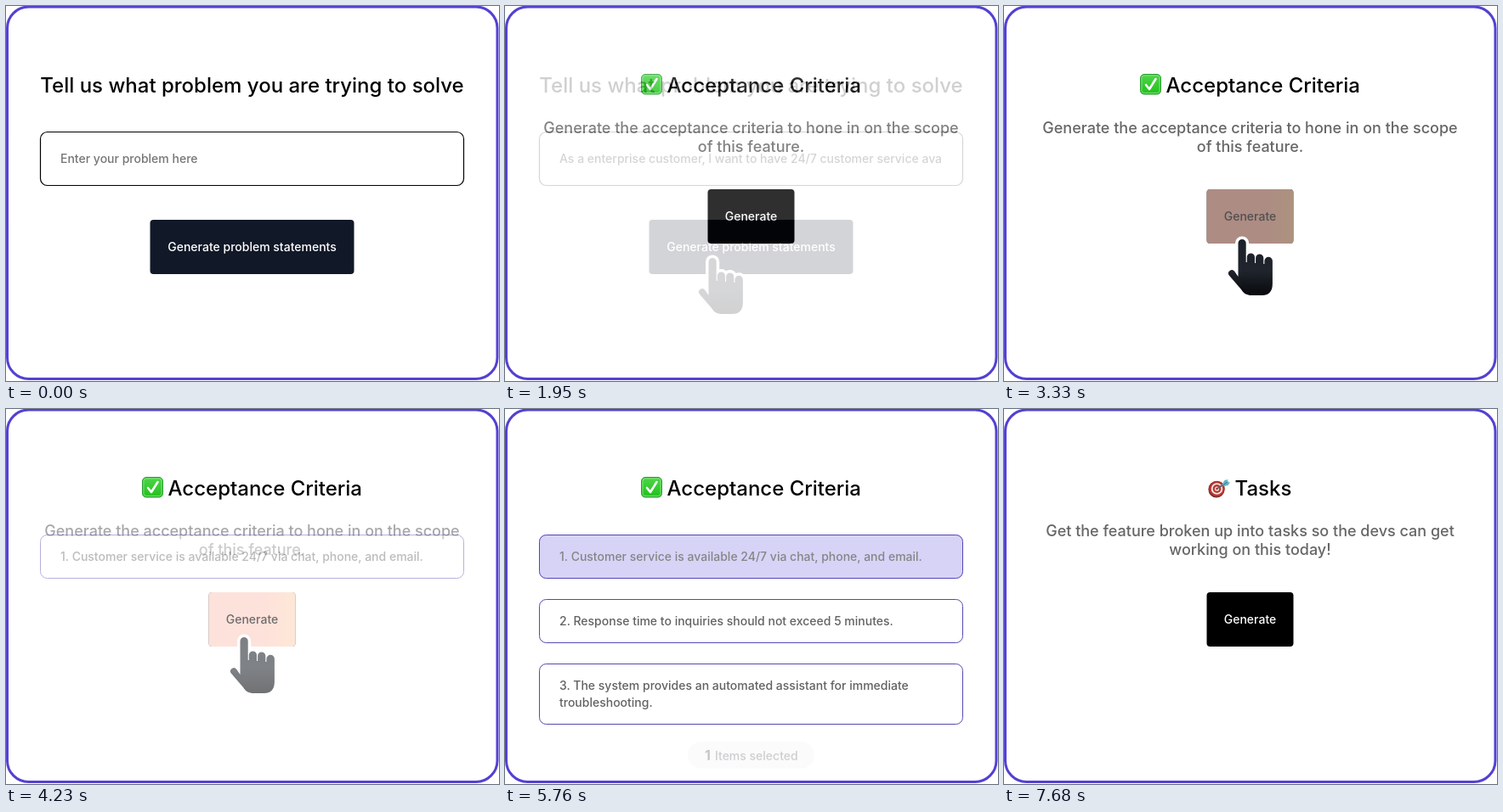
Write an HTML page that moves like this. It is 580 px wide and 442 px high and loops after 8000 ms.

```html
<!DOCTYPE html>
<html lang="en">
<head>
<meta charset="utf-8">
<title>Problem to tasks</title>
<style>
  html, body { margin: 0; width: 100%; height: 100%; overflow: hidden; background: #fff; }
  svg { display: block; }
  text {
    font-family: Inter, "Open Sans", sans-serif;
    font-size: 14px; font-weight: 500; font-optical-sizing: none;
  }
  .title { font-size: 24px; }
  .lead { font-size: 18px; fill: #666; }
  .mid { text-anchor: middle; }
  .item rect { fill: #fff; stroke: #5549b0; }
  .item text { fill: #626262; }

  /* One 8 s clock for all parts: 1% = 80 ms */
  .anim { animation: 8s ease infinite; }
  .hint { animation-name: hint; }
  .prompt { animation-name: prompt; }
  .field { animation-name: field; }
  .hand1 { animation-name: hand1; }
  .criteria { animation-name: criteria; }
  .hand2 { animation-name: hand2; }
  .hover { animation-name: hover; }
  .intro { animation-name: intro; }
  .first { animation-name: first; }
  .second { animation-name: second; }
  .third { animation-name: third; }
  .picked { animation-name: picked; }
  .pill { animation-name: picked, rise; }
  .tasks { animation-name: tasks; animation-timing-function: linear; }

  @keyframes hint { 0%, 1.125% { opacity: 1 } 4.875%, 100% { opacity: 0 } }
  @keyframes prompt { 0%, 1.125% { opacity: 0 } 4.875%, 100% { opacity: 1 } }
  @keyframes field { 0%, 13.5% { stroke: #000 } 17.25%, 100% { stroke: #23233a } }
  @keyframes hand1 {
    0%, 1.125% { opacity: 0; transform: translateY(44px) }
    4.875%, 13.5% { opacity: 1; transform: none }
    17.25%, 100% { opacity: 1; transform: translateY(-27px) }
  }
  @keyframes criteria { 0%, 21.75% { opacity: 0 } 26.875%, 100% { opacity: 1 } }
  @keyframes hand2 {
    0%, 32.25% { transform: translateY(155px) }
    36%, 40.125% { transform: none }
    43.875%, 100% { transform: translateY(-19px) }
  }
  @keyframes hover { 0%, 40.125% { opacity: 0 } 43.875%, 100% { opacity: 1 } }
  @keyframes intro { 0%, 52.5% { opacity: 1 } 54%, 100% { opacity: 0 } }
  @keyframes first { 0%, 52.5% { opacity: 0 } 54%, 100% { opacity: 1 } }
  @keyframes second { 0%, 57.375% { opacity: 0 } 61.125%, 100% { opacity: 1 } }
  @keyframes third { 0%, 64.5% { opacity: 0 } 68.25%, 100% { opacity: 1 } }
  @keyframes picked { 0%, 71.25% { opacity: 0 } 75.75%, 100% { opacity: 1 } }
  @keyframes rise { 0%, 71.25% { transform: translateY(5px) } 75.75%, 100% { transform: none } }
  @keyframes tasks { 0%, 95.25% { opacity: 0 } 96%, 100% { opacity: 1 } }
</style>
</head>
<body>
<svg width="580" height="442" viewBox="0 0 580 442">
  <defs>
    <linearGradient id="skin" x2="0" y2="1">
      <stop stop-color="#1c2129"/>
      <stop offset=".55" stop-color="#20252d"/>
      <stop offset="1" stop-color="#08090c"/>
    </linearGradient>
    <linearGradient id="peach">
      <stop stop-color="#fcccc1"/>
      <stop offset=".65" stop-color="#fcccc0"/>
      <stop offset="1" stop-color="#fdd5ba"/>
    </linearGradient>
    <linearGradient id="green" x2="0" y2="1">
      <stop stop-color="#4fd64a"/>
      <stop offset="1" stop-color="#1fc119"/>
    </linearGradient>
    <path id="hand" fill="url(#skin)" stroke="#fff" stroke-width="7" stroke-linejoin="round" paint-order="stroke"
      d="M11.5 4.6a4.6 4.6 0 0 1 9.2 0V27h1.1V21a4.6 4.6 0 0 1 9.2 0V28h1.1V22a4.6 4.6 0 0 1 9.2 0V29h1.1V25.500a4.600 4.600 0 0 1 9.500 0V52C52 62 47 66 40 66H27C22 66 18 64 15 59L.8 42.500A3.900 3.900 0 0 1 7.200 37.800L11.500 44Z"/>
    <g id="button">
      <rect x="238.500" y="216" width="102" height="64" rx="4"/>
      <text class="mid" x="289.500" y="253" fill="#fff">Generate</text>
    </g>
  </defs>

  <!-- Problem form -->
  <g>
    <text class="title mid" x="289.500" y="102">Tell us what problem you are trying to solve</text>
    <rect class="anim field" x="40.500" y="148.500" width="498" height="63" rx="8" fill="#fff" stroke="#000" stroke-width="1.200"/>
    <text class="anim hint" x="64" y="185" fill="#757575">Enter your problem here</text>
    <svg x="64" y="165" width="451" height="30" overflow="hidden">
      <text class="anim prompt" y="20" fill="#1a1a1a">As a enterprise customer, I want to have 24/7 customer service available</text>
    </svg>
    <rect x="169.500" y="252" width="240" height="64" rx="4" fill="#111827"/>
    <text class="mid" x="289.500" y="289" fill="#fff">Generate problem statements</text>
    <g transform="translate(228 324)"><use class="anim hand1" href="#hand"/></g>
  </g>

  <!-- Acceptance criteria -->
  <g class="anim criteria">
    <rect width="580" height="442" fill="#fff"/>
    <g transform="translate(160 80)">
      <rect x=".5" y=".5" width="24" height="23.500" rx="4.500" fill="url(#green)" stroke="#2f9a38"/>
      <rect x="2" y="2" width="21" height="20.500" rx="3" fill="none" stroke="#8be587" stroke-width=".8"/>
      <path d="M7 13l4 5 7.500-12" fill="none" stroke="#fff" stroke-width="2.600" stroke-linecap="round" stroke-linejoin="round"/>
    </g>
    <text class="title" x="190.500" y="102">Acceptance Criteria</text>

    <g class="anim intro">
      <text class="lead mid" x="289.500" y="150">Generate the acceptance criteria to hone in on the scope</text>
      <text class="lead mid" x="289.500" y="172">of this feature.</text>
      <use href="#button"/>
      <g class="anim hover">
        <rect x="238.500" y="216" width="102" height="64" rx="4" fill="url(#peach)"/>
        <text class="mid" x="289.500" y="253">Generate</text>
      </g>
      <g transform="translate(264 288)"><use class="anim hand2" href="#hand"/></g>
    </g>

    <g class="anim item first">
      <rect x="40.500" y="148.500" width="498" height="51" rx="8"/>
      <text x="64" y="179">1. Customer service is available 24/7 via chat, phone, and email.</text>
    </g>
    <g class="anim item second">
      <rect x="40.500" y="224.500" width="498" height="51" rx="8"/>
      <text x="64" y="255">2. Response time to inquiries should not exceed 5 minutes.</text>
    </g>
    <g class="anim item third">
      <rect x="40.500" y="300.500" width="498" height="71" rx="8"/>
      <text x="64" y="331">3. The system provides an automated assistant for immediate</text>
      <text x="64" y="351">troubleshooting.</text>
    </g>
    <g class="anim picked">
      <rect x="40" y="148" width="499" height="52" rx="8" fill="#503fde"/>
      <text x="64" y="179" fill="#fff">1. Customer service is available 24/7 via chat, phone, and email.</text>
    </g>
    <g class="anim pill">
      <rect x="215" y="388" width="149" height="32" rx="16" fill="#ececec"/>
      <text x="235" y="410" style="font-size:16px;font-weight:700">1</text>
      <text x="247" y="410" fill="#222230">Items selected</text>
    </g>
  </g>

  <!-- Tasks -->
  <g class="anim tasks">
    <rect width="580" height="442" fill="#fff"/>
    <g transform="translate(250.500 94)">
      <ellipse cx="-.6" cy=".8" rx="9.500" ry="9.800" fill="#6d2a26"/>
      <circle r="9.300" fill="#b8352f"/>
      <circle r="6.800" fill="#f3e9e6"/>
      <circle r="4.900" fill="#bd3830"/>
      <circle r="2.600" fill="#f3e9e6"/>
      <circle r="1.300" fill="#a82a26"/>
      <path d="M0 0L9-6" stroke="#5d6670" stroke-width="1.600"/>
      <path d="M6-5L9-10 13-11 12-8 15.500-7.500 13-4 8-3Z" fill="#62b4c3"/>
      <path d="M7-4L13-8.500" stroke="#34798c"/>
    </g>
    <text class="title" x="271.500" y="102">Tasks</text>
    <text class="lead mid" x="289.500" y="150">Get the feature broken up into tasks so the devs can get</text>
    <text class="lead mid" x="289.500" y="172">working on this today!</text>
    <use href="#button"/>
  </g>

  <rect x="1.500" y="1" width="576.500" height="438.500" rx="25" fill="none" stroke="#5341d2" stroke-width="3"/>
</svg>
</body>
</html>
```
